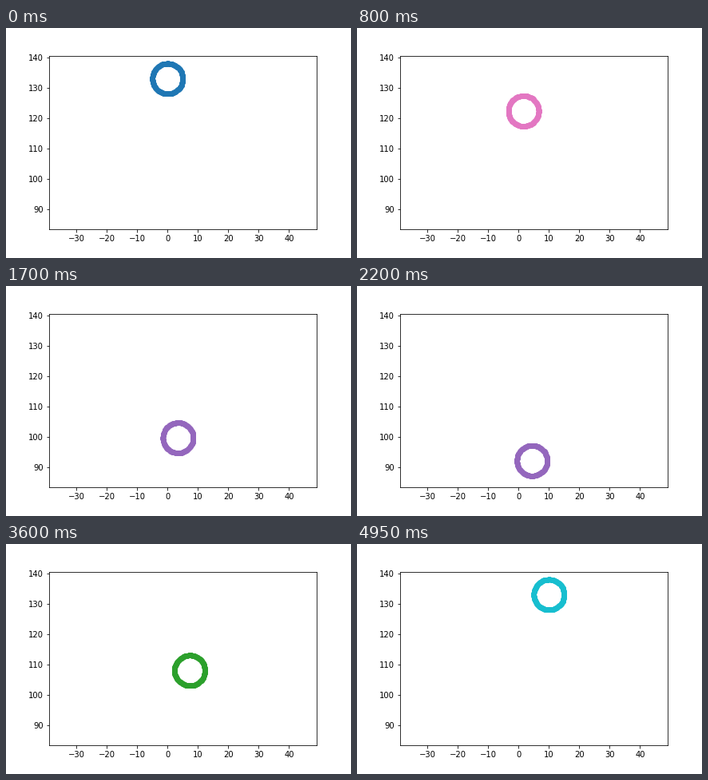
Animation of 432x288 px, one loop 5 s. Source, as a matplotlib script:

```python
import numpy as np
import matplotlib.pyplot as plt
from matplotlib.animation import FuncAnimation

FRAMES = 100
RADIUS = 5
CRANK = 21
MID = 112

plt.rcParams["font.family"] = "DejaVu Sans"
plt.rcParams["font.size"] = 10

fig, ax = plt.subplots(figsize=(6, 4), dpi=72)
fig.subplots_adjust(left=0.125, right=0.9, bottom=0.125, top=0.88)

# Equal scale on both axes, with a 5% margin above and below the path
half_h = (CRANK + RADIUS) * 1.1
half_w = half_h * (6 * 0.775) / (4 * 0.755)
ax.set_xlim(5 - half_w, 5 + half_w)
ax.set_ylim(MID - half_h, MID + half_h)

angle = np.linspace(0, 2 * np.pi, 100)
ring_x = RADIUS * np.cos(angle)
ring_y = RADIUS * np.sin(angle)
ring, = ax.plot([], [], "o", markersize=6)


def center(i):
    """Steady drift to the right with a crank-driven rise and fall."""
    t = i / (FRAMES - 1)
    turn = 2 * np.pi * t
    return 10 * t, MID + CRANK * np.cos(turn) - np.sin(turn) ** 2


def update(i):
    x, y = center(i)
    ring.set_data(x + ring_x, y + ring_y)
    ring.set_color(f"C{i % 10}")
    return ring,


anim = FuncAnimation(fig, update, frames=FRAMES, interval=50,
                     repeat=True, repeat_delay=0)
plt.show()
```
